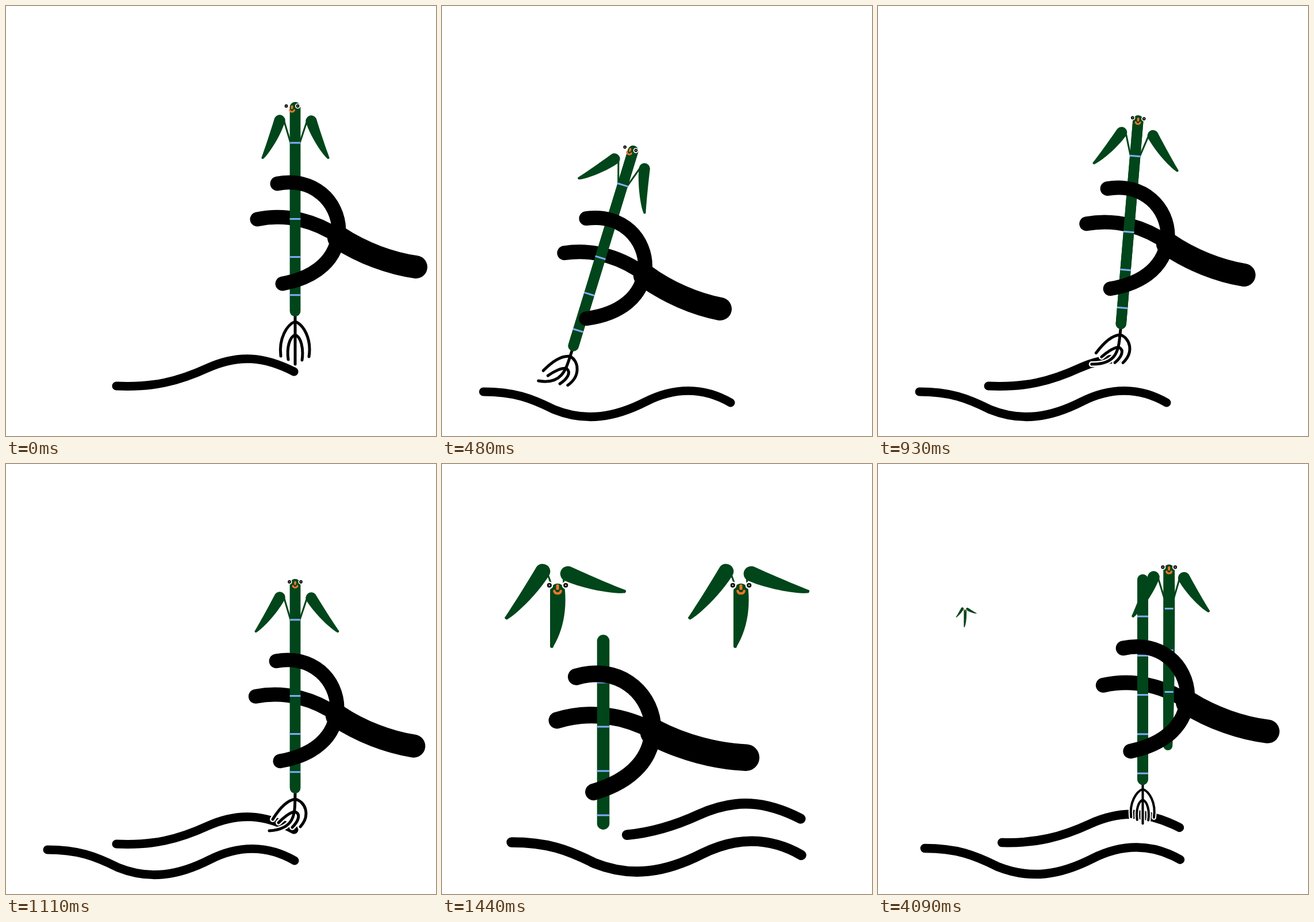
Recreate the animation shown at these times as an HTML page. Size 748x748 px, loop 4120 ms.

```html
<!DOCTYPE html>
<html lang="en">
<head>
<meta charset="utf-8">
<title>Bamboo brush</title>
<style>
  html, body { margin: 0; width: 100%; height: 100%; overflow: hidden; background: #fff; }
  svg { display: block; width: 100vw; height: 100vh; }
</style>
</head>
<body>
<svg id="stage" viewBox="0 0 748 748" fill="none" stroke-linecap="round" stroke-linejoin="round"></svg>
<script>
const LOOP = 4120, STEP = 30;
const GREEN = '#00461a', BLUE = '#86aaff', ORANGE = '#f4752a';

const LOWER = 'M72 671C125 671 155 682 195 702C250 724 300 716 355 688C405 663 455 663 502 690';
const UPPER = 'M192 661C255 664 300 653 350 630C405 605 450 610 501 636';
const FINGERS = 'M472 309C535 297 578 340 579 390C577 440 540 472 481 483';
const ARM = 'M437 371C490 360 540 375 580 402';
const WRIST = 'M579 403C620 430 670 448 713 454';

// Brush poses: time, foot x y, tilt, bristle sweep, hand x y, hand turn, left leaf tip, right leaf tip
const POSES = [
  [0,    503, 540, 0,    0,   578, 400, 0,   -57, 98, 58, 98],
  [480,  226, 600, 17,   .9,  352, 466, 3,   -77, 83, 51, 107],
  [540,  213, 602, 17.1, .95, 339, 468, 3,   -77, 83, 53, 106],
  [930,  422, 562, 4.8,  1,   503, 411, 1.3, -71, 90, 76, 91],
  [1080, 503, 573, 0,    1,   575, 435, .7,  -69, 92, 75, 92],
  [1110, 503, 573, 0,    1,   575, 435, .7,  -69, 92, 75, 92],
  [1230, 503, 540, 0,    0,   578, 400, 0,   -57, 98, 58, 98]
];

// Bristle curves (one cubic each): hanging straight and swept back
const HANGING = [
  [0, 0, 0, 30, 0, 55, 0, 83],
  [0, 9, -14, 14, -29, 38, -25, 69],
  [0, 9, 14, 14, 29, 38, 24, 70],
  [0, 32, -10, 36, -15, 55, -12, 75],
  [0, 32, 10, 36, 15, 55, 12, 76]
];
const SWEPT = [
  [0, 0, -1, 30, 4, 62, -45, 65],
  [0, 10, -14, 12, -26, 24, -39, 45],
  [0, 10, 18, 14, 27, 38, 9, 58],
  [0, 32, -8, 32, -20, 42, -29, 51],
  [0, 32, 10, 36, 6, 48, -5, 59]
];

const mix = (a, b, k) => a + (b - a) * k;
const clamp = v => Math.max(0, Math.min(1, v));
const line = (d, width, color = '#000', extra = '') =>
  `<path d="${d}" stroke="${color}" stroke-width="${width}" ${extra}/>`;
const fill = (d, color = GREEN) => `<path d="${d}" fill="${color}"/>`;
const dot = (x, y, r, color) => `<circle cx="${x}" cy="${y}" r="${r}" fill="${color}"/>`;
const group = (transform, ...parts) => `<g transform="${transform}">${parts.join('')}</g>`;

function poseAt(t) {
  const i = POSES.findIndex(row => row[0] > t);
  if (i < 0) return POSES[POSES.length - 1];
  const a = POSES[i - 1], b = POSES[i];
  let k = (t - a[0]) / (b[0] - a[0]);
  if (i === 1) k = (1 - Math.cos(Math.PI * k)) / 2;
  return a.map((v, n) => mix(v, b[n], k));
}

// 0 = finished character, 1 = bamboo brush
function brushness(t) {
  if (t < 3970) return 1 - clamp((t - 1260) / 180);
  return clamp(.198 + (t - 3970) / 180);
}

function stroke(d, from, to) {
  return to <= from ? '' : line(d, 15, '#000',
    `pathLength="1" stroke-dasharray="${to - from} 2" stroke-dashoffset="${-from}"`);
}

function waves(t, p) {
  const low = t < 450 ? t / 450 : 1;
  const high = t < STEP || t >= 1080 ? 1 : clamp((t - 540) / 540);
  return group(`translate(${mix(121, 72, p)} ${mix(658, 671, p)}) scale(${mix(1.172, 1, p)}) translate(-72 -671)`,
    stroke(LOWER, 0, low), stroke(UPPER, .16 * (1 - p), high));
}

function bristles(sweep) {
  const curves = HANGING.map((row, i) => {
    const c = row.map((v, n) => mix(v, SWEPT[i][n], sweep));
    return `M${c.slice(0, 2)}C${c.slice(2)}`;
  });
  return curves.map(d => line(d, 10, '#fff')).join('') + curves.map(d => line(d, 5)).join('');
}

const band = (y, half) => line(`M${-half} ${y}H${half}`, 3, BLUE, 'stroke-linecap="butt"');

// Local origin at the foot, growing upwards
function stalk(p) {
  const foot = mix(636, 540, p), top = mix(297, 167, p) - foot, half = mix(10.8, 9.2, p);
  let out = line(`M0 ${top + half}V${-half}`, half * 2, GREEN);
  for (let i = 0; i < 5; i++) {
    const y = mix(380 + 77 * i, 238 + 66.2 * i, p) - foot;
    if (y < -4) out += band(y, half);
  }
  return out;
}

function leaf(ax, ay, bx, by, r, side) {
  const len = Math.hypot(bx - ax, by - ay);
  const turn = Math.atan2(by - ay, bx - ax) * 180 / Math.PI - 90;
  const e = .2 * r;
  return group(`translate(${ax} ${ay}) rotate(${turn}) scale(${side} 1)`,
    fill(`M${-r} 0A${r} ${r} 0 0 1 ${r} 0C${1.25 * r} ${.35 * len} ${.8 * r} ${.8 * len} ${e} ${len}` +
      `Q0 ${len + 2} ${-e} ${len}C${-.3 * r} ${.8 * len} ${-.6 * r} ${.4 * len} ${-r} 0Z`));
}

function stem(p, len) {
  const r = mix(13, 9.2, p), end = mix(3, 9.2, p), dx = -10 * (1 - p), bulge = 3 * (1 - p);
  const low = len - end;
  let out = fill(`M${-r} ${r}A${r} ${r} 0 0 1 ${r} ${r}` +
    `C${r + bulge} ${.45 * len} ${mix(8, r, p)} ${.75 * len} ${dx + end} ${low}` +
    `A${end} ${end} 0 0 1 ${dx - end} ${low}C${mix(-13, -r, p)} ${.75 * len} ${-r} ${.4 * len} ${-r} ${r}Z`);
  for (let i = 0; i < 5; i++) {
    const y = mix(101, 71, p) + mix(99, 66.2, p) * i;
    if (p > 0 && y < len - 4) out += band(y, 9.2 * p);
  }
  return out;
}

function face(p, shift) {
  const eye = x => dot(x, 0, 4.6, '#fff') + dot(x, 0, 2.9, '#111') + dot(x, 0, .8, '#f5efb0');
  return group(`translate(${shift} ${shift ? 7 : mix(3, 5, p)}) scale(${mix(1.42, 1, p)})`,
    eye(-10), eye(10),
    line('M0 .5V3.8', 3.6, ORANGE), line('M-4 7C-3 11 3 11 4 7', 3, ORANGE));
}

// Local origin at the top of the head
function sprout(p, len, tips, shift) {
  const [lx, ly, rx, ry] = tips;
  const a = [mix(-26, -27, p), mix(-21, 32, p)], b = [mix(18, 28, p), mix(-17, 33, p)];
  const r = mix(13.3, 9.7, p), hip = mix(1, 71, p), side = mix(11, 8, p);
  return line(`M${a[0] + 8} ${a[1] + 2}L${-side} ${hip}M${b[0] - 8} ${b[1] + 2}L${side} ${hip}`, 3, GREEN) +
    leaf(...a, mix(-90, lx, p), mix(61, ly, p), r, 1) +
    leaf(...b, mix(118, rx, p), mix(14, ry, p), r, -1) +
    stem(p, len) + face(p, shift);
}

function scene(t) {
  const p = brushness(t);
  const [, footX, footY, tilt, sweep, handX, handY, handTurn, ...tips] = poseAt(t);
  const foot = [mix(280.5, footX, p), mix(636, footY, p)];
  const lean = tilt * Math.PI / 180;
  const head = [mix(520, footX + 373 * Math.sin(lean), p), mix(208, footY - 373 * Math.cos(lean), p)];
  const hand = `translate(${mix(366.5, handX, p)} ${mix(463.5, handY, p)}) ` +
    `rotate(${mix(-5.6, handTurn, p)}) scale(${mix(1.163, 1, p)}) translate(-578 -400)`;
  const onFoot = `translate(${foot}) rotate(${tilt})`;
  const shift = t < 540 ? -5.5 : 0;

  return waves(t, p) +
    (p > 0 ? group(`${onFoot} scale(${p})`, bristles(sweep)) : '') +
    group(hand, line(ARM, 25), line(WRIST, 40)) +
    group(onFoot, stalk(p)) +
    group(`translate(${head}) rotate(${tilt})`, sprout(p, mix(112, 373, p), tips, shift)) +
    (p < 1 ? group(`translate(${mix(201, 140, p)} ${mix(208, 264, p)}) scale(${1 - p})`,
      sprout(p * .3, 112 + 60 * p, tips, 0)) : '') +
    group(hand, line(FINGERS, 25));
}

const stage = document.getElementById('stage');
const start = performance.now();
let shown = -1;

function tick(now) {
  const t = Math.floor(Math.max(0, now - start) % LOOP / STEP) * STEP;
  if (t !== shown) stage.innerHTML = scene(shown = t);
  requestAnimationFrame(tick);
}
tick(start);
</script>
</body>
</html>
```
